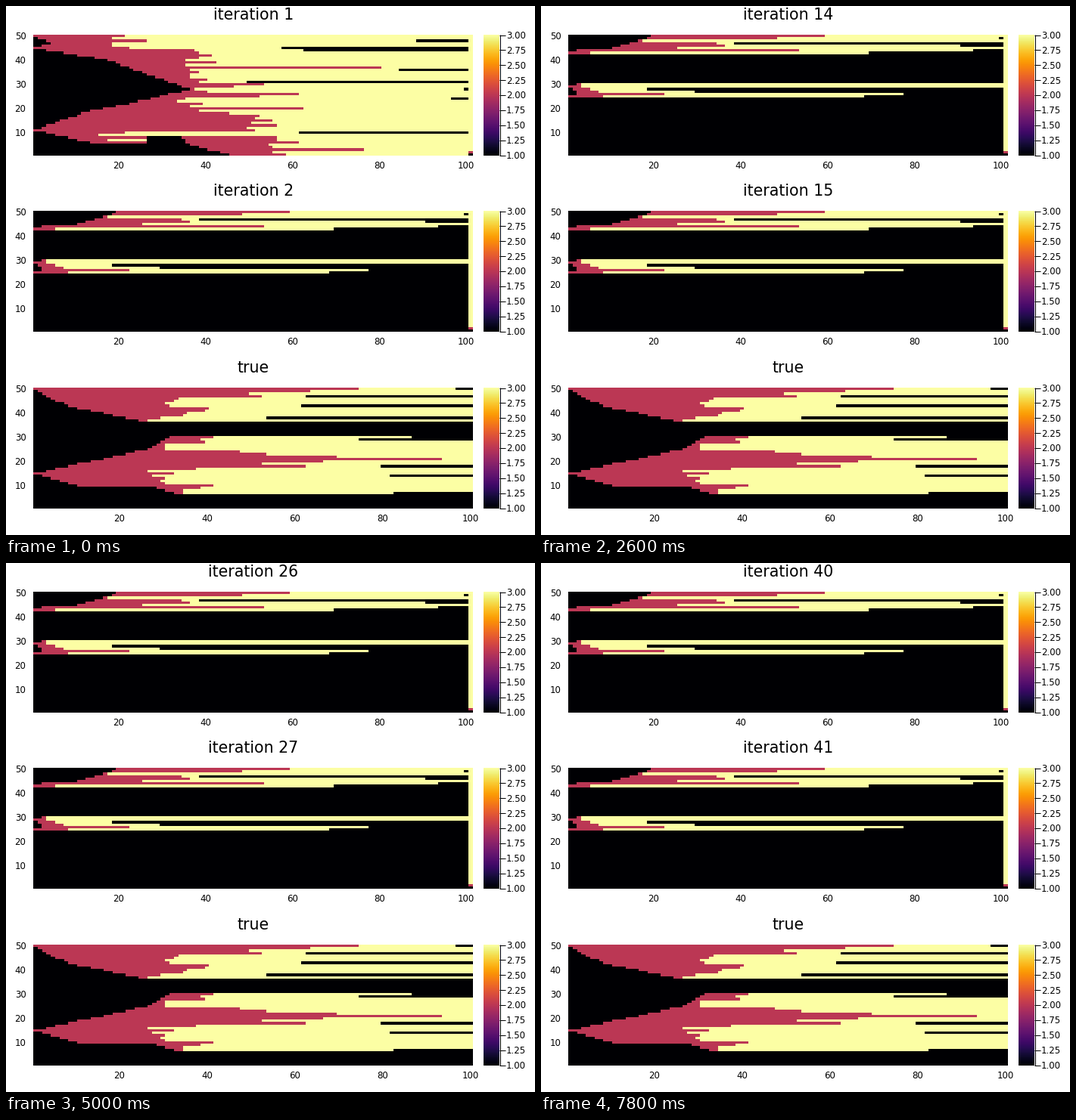
A matplotlib script that plays this animation: 699x700 px, repeating every 8 s.

```python
import numpy as np
import matplotlib.pyplot as plt
from matplotlib.animation import FuncAnimation

W, H, DPI = 699, 700, 64
PT = 72 / DPI  # points per pixel
LEFT, RIGHT, HEIGHT = 36.4, 616.8, 160
BLACK, RED, YELLOW = 1, 2, 3
ROWS = 50


def along(rows, corners):
    """Columns for the given rows on the polyline through (row, column) corners."""
    return np.interp(rows, *zip(*corners))


def infect(grid, front, turn, spread=0, ends=None, lapse=0, seed=1):
    """Rows covered by the front turn red there, yellow at the turn line plus a
    random delay, and black again at their end column."""
    rng = np.random.default_rng(seed)
    width = grid.shape[1]
    rows = np.arange(front[0][0], front[-1][0] + 1)
    starts = np.rint(along(rows, front)).astype(int)
    stops = np.rint(along(rows, turn) + spread * rng.exponential(size=rows.size))
    for row, start, stop in zip(rows, starts, stops.astype(int)):
        end = (ends or {}).get(row, width)
        if rng.random() < lapse:
            end = rng.integers(45, width)
        line = grid[row - 1]
        line[start:stop] = RED
        line[stop:max(stop, end)] = YELLOW
        line[max(stop, end):] = BLACK


def blank(width):
    return np.full((ROWS, width), BLACK)


def close_column(grid):
    grid[2:, 100] = YELLOW
    grid[1, 100] = RED
    grid[0, 100] = BLACK
    return grid


def first_state():
    grid = blank(101)
    infect(grid, [(6, 13), (11, 0), (19, 13), (22, 22), (28, 36), (33, 28),
                  (40, 17), (45, 0), (47, 4), (50, 0)],
           [(6, 14), (10, 14), (11, 45), (18, 45), (19, 28), (28, 36),
            (40, 34), (45, 18), (50, 15)], spread=7, lapse=0.25, seed=4)
    grid[5:8, 26:36] = BLACK
    infect(grid, [(1, 45), (5, 36), (8, 34)], [(1, 54), (8, 54)], spread=4)
    return close_column(grid)


def settled_state():
    grid = blank(101)
    turns = [5, 53, 25, 36, 34, 17, 48, 59]
    infect(grid, [(43, 0), (44, 2), (45, 10), (48, 16), (50, 19)],
           list(enumerate(turns, 43)),
           ends={43: 69, 44: 93, 46: 90, 47: 38, 49: 99})
    infect(grid, [(25, 0), (26, 2), (27, 2), (29, 0), (30, 2)],
           list(enumerate([8, 22, 7, 5, 3, 3], 25)),
           ends={25: 68, 26: 77, 27: 29, 28: 18})
    return close_column(grid)


def true_state():
    grid = blank(100)
    infect(grid, [(37, 24), (42, 10), (45, 5), (50, 0)],
           [(37, 25), (39, 30), (46, 28), (50, 65)], spread=8, seed=2,
           ends={38: 53, 43: 61, 47: 62, 50: 96})
    infect(grid, [(7, 32), (9, 28), (10, 10), (15, 0), (20, 13), (25, 26),
                  (30, 31)],
           [(7, 33), (10, 28), (16, 26), (20, 58), (21, 90), (22, 57),
            (25, 28), (30, 34)], spread=6, seed=3,
           ends={7: 82, 14: 81, 18: 79, 29: 74, 30: 86})
    return grid


plt.rcParams["font.family"] = "DejaVu Sans"
fig = plt.figure(figsize=(W / DPI, H / DPI), dpi=DPI, facecolor="white")
ax = fig.add_axes([0, 0, 1, 1])
ax.axis("off")


def label(x, y, text, size=11.7, ha="center"):
    return ax.text(x, y, text, fontsize=size * PT, ha=ha, va="baseline",
                   color="black")


def line(x0, y0, x1, y1):
    ax.plot([x0, x1], [y0, y1], color="black", lw=PT, solid_capstyle="butt")


def shade(values, x0, x1, top, bottom, low, high):
    return ax.imshow(values, cmap="inferno", vmin=low, vmax=high,
                     origin="lower", interpolation="nearest", aspect="auto",
                     extent=(x0, x1, bottom - 0.1, top + 0.1))


def panel(grid, top):
    """Heatmap with axis labels, title and colour bar; returns image, title."""
    bottom = top + HEIGHT
    cols = grid.shape[1]
    image = shade(grid, LEFT, RIGHT, top, bottom, 1, 3)
    for v in range(20, 101, 20):
        x = LEFT + (v - 0.5) * (RIGHT - LEFT) / cols
        label(x, bottom + 16.6, str(v))
    for v in range(10, 51, 10):
        y = bottom - (v - 0.5) * HEIGHT / ROWS
        label(26.5, y + 4.6, str(v), ha="right")

    ramp = np.linspace(0, 1, 256)[:, None]
    shade(ramp, 631.1, 651.9, top, bottom, 0, 1)
    line(652.5, top, 652.5, bottom)
    for i in range(9):
        y = bottom - 0.5 - i * (HEIGHT - 1) / 8
        line(652, y, 660, y)
        label(661, y + 4.4, f"{1 + i / 4:.2f}", ha="left")
    title = label(326.8, top - 20, "", size=20.5)
    return image, title


initial, settled = first_state(), settled_state()
upper, upper_title = panel(initial, 38)
_, middle_title = panel(settled, 271)
_, true_title = panel(true_state(), 505)
true_title.set_text("true")
ax.set_xlim(0, W)
ax.set_ylim(H, 0)


def draw(i):
    upper.set_data(initial if i == 0 else settled)
    upper_title.set_text(f"iteration {i + 1}")
    middle_title.set_text(f"iteration {i + 2}")
    return upper, upper_title, middle_title


anim = FuncAnimation(fig, draw, frames=40, interval=200, repeat=True,
                     repeat_delay=0, blit=False)
plt.show()
```
